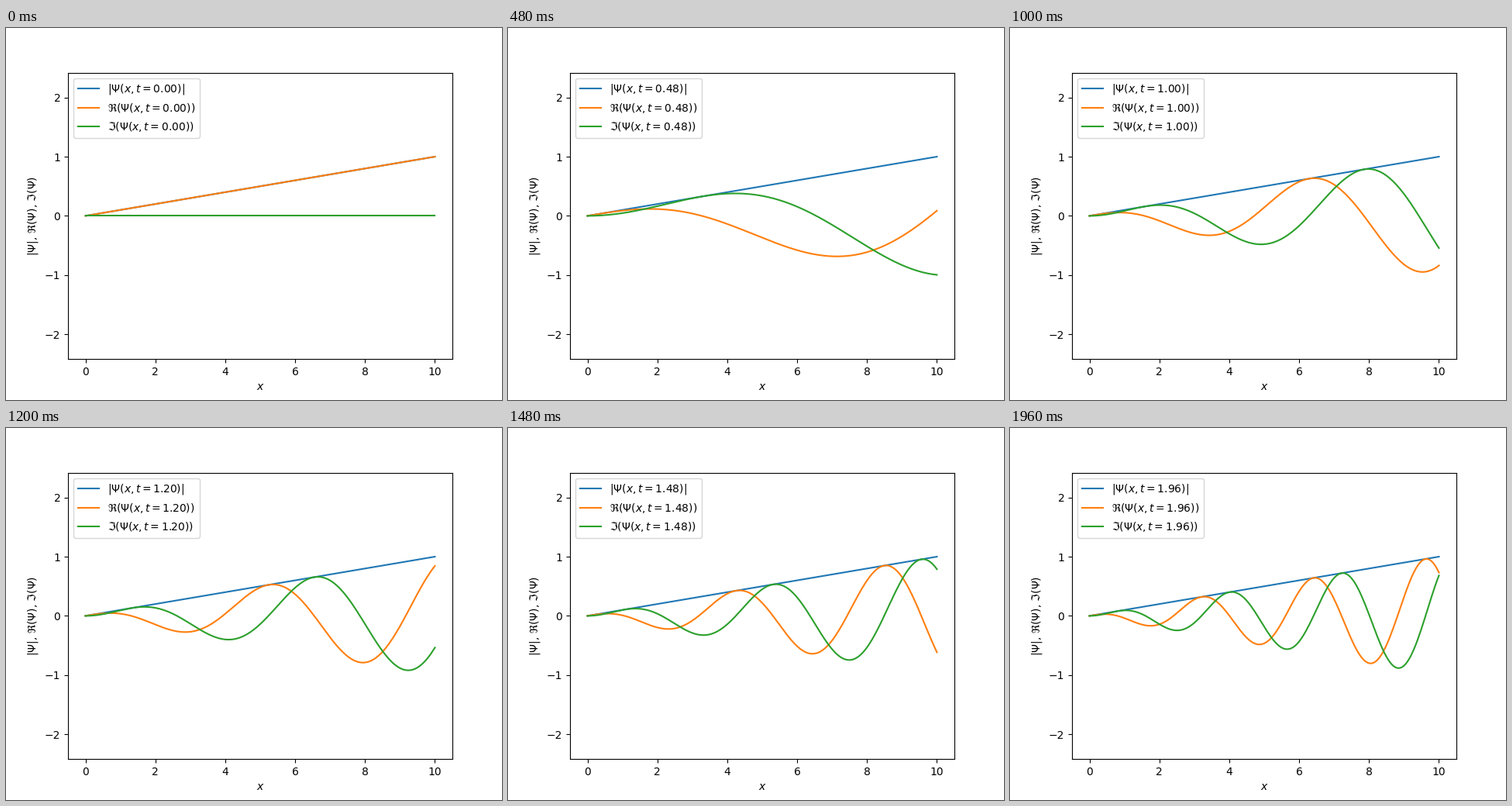
These frames come from a looping animation (640x480 px, 2000 ms). A matplotlib script:

```python
import numpy as np
import matplotlib.pyplot as plt
from matplotlib.animation import FuncAnimation

FRAMES = 50
INTERVAL = 40  # ms
LENGTH = 10

PARTS = [
    (np.abs, r"$|\Psi(x, t={:.2f})|$"),
    (np.real, r"$\Re(\Psi(x, t={:.2f}))$"),
    (np.imag, r"$\Im(\Psi(x, t={:.2f}))$"),
]

x = np.linspace(0, LENGTH, 200)


def psi(t):
    """Linear envelope with a phase that winds up in time."""
    return x / LENGTH * np.exp(1j * x * t)


fig, ax = plt.subplots(figsize=(6.4, 4.8), dpi=100)
ax.set_xlim(-0.5, 10.5)
ax.set_ylim(-2.42, 2.42)
ax.set_xlabel("$x$")
ax.set_ylabel(r"$|\Psi|$, $\Re(\Psi)$, $\Im(\Psi)$")

lines = [ax.plot(x, part(psi(0)), label=label.format(0))[0]
         for part, label in PARTS]
legend = ax.legend(loc="upper left")


def update(i):
    t = i * INTERVAL / 1000
    wave = psi(t)
    for line, text, (part, label) in zip(lines, legend.get_texts(), PARTS):
        line.set_ydata(part(wave))
        text.set_text(label.format(t))
    return lines


anim = FuncAnimation(fig, update, frames=FRAMES, interval=INTERVAL,
                     repeat=True, repeat_delay=0)

plt.show()
```
